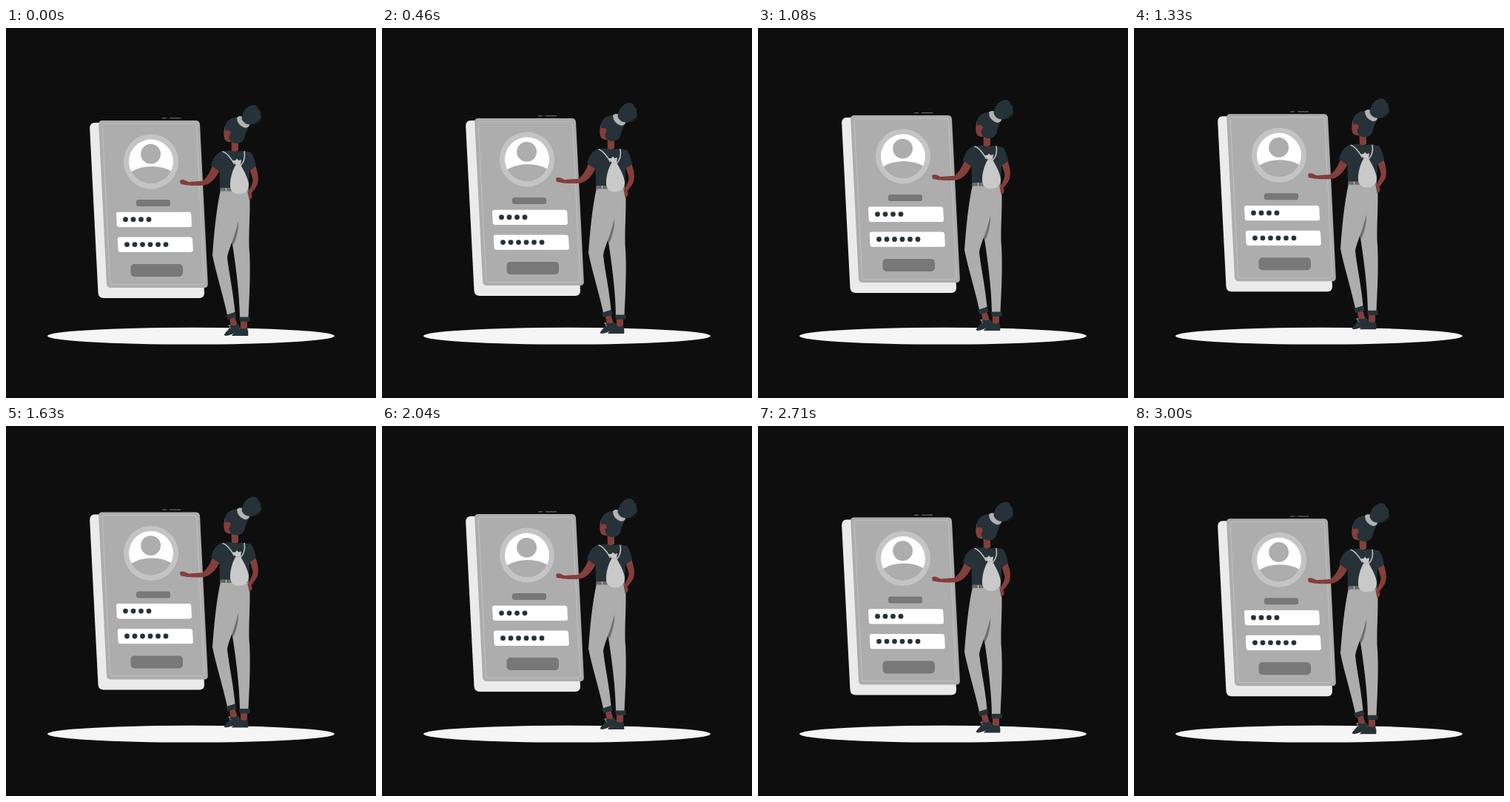
An HTML page for the animation above (3.04 s loop, 500 by 500 pixels).

```html
<!DOCTYPE html>
<html lang="en">
<head>
<meta charset="utf-8">
<title>Login card</title>
<style>
  html, body { margin: 0; height: 100%; overflow: hidden; background: #0e0e0e; }
  svg { display: block; width: 100vw; height: 100vh; }
  .dark { fill: #263238; }
  .skin { fill: #843e3b; }
  .grey { fill: #adadad; }
  .slate { fill: #787878; }
  .line { fill: none; stroke: #c7c7c7; }
</style>
</head>
<body>
<svg viewBox="0 0 500 500">
  <defs><clipPath id="disc"><circle cx="196" cy="180.6" r="30"/></clipPath></defs>
  <ellipse cx="250" cy="416.2" rx="194" ry="11.4" fill="#f5f5f5"/>
  <g id="float">
    <!-- card -->
    <path fill="#ebebeb" d="M120 128H250Q256 128 256.400 135L268 358Q268 365 261 365H132Q125 365 124.500 358L113.200 136Q113 128 120 128Z"/>
    <path class="grey" d="M130 125H256.500Q261.500 125 262 130L272.800 346Q273 351 268 351H141.500Q136.500 351 136 346L125.200 130Q125 125 130 125Z"/>
    <path class="line" stroke-width=".8" d="M133 129.300H254Q257.300 129.300 257.500 132.500L267.800 343Q268 346.500 265 346.500H144Q141 346.500 140.700 343L130.200 132.500Q130 129.300 133 129.300Z"/>
    <path class="line" style="stroke:#777" d="M211 121.800H217M221 121.800H236"/>
    <circle cx="196" cy="180.500" r="37" fill="#c4c4c4"/>
    <circle cx="196" cy="180.600" r="30" fill="#fff"/>
    <g class="grey" clip-path="url(#disc)">
      <circle cx="195.600" cy="170.200" r="13.400"/>
      <ellipse cx="197" cy="210" rx="38" ry="23"/>
    </g>
    <rect class="slate" x="176" y="232" width="46" height="9" rx="3"/>
    <path id="field" fill="#fff" d="M152 248.700H247Q250 248.700 250.200 251.700L251 266Q251.200 269 248 269H153Q150 269 149.800 266L149 251.700Q149 248.700 152 248.700Z"/>
    <use href="#field" x="1.800" y="33.800"/>
    <g id="dots" class="dark"></g>
    <rect class="slate" x="168.500" y="319" width="70.500" height="17" rx="5"/>

    <!-- legs -->
    <path class="skin" d="M302 393L309 390L313 402L304 404ZM317 396H326V408H317Z"/>
    <path class="dark" d="M294.500 415C297 410 302 407 305 401Q309 404 313 400L317 404C315 410 306 415 297 416Z"/>
    <path class="dark" d="M305 416C308 411 314 409 317 405Q322 408 326 405Q328 410 327.300 416Z"/>
    <path class="line" stroke-width=".8" d="M300 402L303 401.500L302 404L304 406"/>
    <path class="grey" d="M304 220H328.500C331 240 328 268 328.500 295C331 325 329 360 327.500 391H316C315.500 360 311 325 306 292L309 240Z"/>
    <path fill="#707070" d="M314 258C315 272 311 285 307.500 293L305 291L309 262Z"/>
    <path class="grey" d="M290 219H320C321 238 315 258 311 272C307 287 300 301 299 310C301 330 307 356 309.500 384L299 387.500C293 360 283 328 279 307C281 280 284 245 290 219Z"/>
    <path class="dark" d="M297 388L310 384L311.500 390.500L299.500 394ZM315 390.500H329.500V396.500L316 397Z"/>

    <!-- body -->
    <path class="skin" d="M329 190L337 186C341 196 342 205 339.500 212C337 217 334 220 331.500 223.500C334 227 332 231 328.500 232L326.500 222C330 216 335 209 333 203Z"/>
    <path class="skin" d="M279 186L288.500 193C284 202 277 211 268 212.500C258 213.500 246 213 240 211.500L236 211L235 206.500C238 203.500 243 206 246 208L265 206.800C271 203 276 195 279 186Z"/>
    <path fill="#6b6b6b" d="M289.500 215.500H328V220.500H289Z"/>
    <path class="line" d="M297.500 216V220.500"/>
    <path class="dark" d="M292 166.500L304 165.500Q311 168.500 319 166L331 168C335 173 337 181 338 187L329 193L328 216H289L288.500 194L277 186C279 178 283 169 292 166.500Z"/>
    <path class="skin" d="M304.500 150H314V165.500Q309.500 168.500 304.800 165.500Z"/>
    <path class="line" stroke-width="1.500" d="M292.500 167C298 168 305 177 308.500 184M322 166.500C323.500 175 321 182 317 186"/>
    <path fill="#c9c9c9" d="M310.500 185L306 179L310 179L312 176.500L314.500 179L318 178L317 185C321 192 327 202 328 211C328.500 219 324 223.500 317 224.200C310 225 303.500 222 303 214C302.500 204 306 192 310.500 185Z"/>
    <path fill="none" stroke="#a5a5a5" stroke-width=".7" d="M310 185H317"/>

    <!-- head -->
    <path class="skin" d="M296 132C294 138 293.500 147 296 151C298 154 303 155 307 153L312 136Z"/>
    <path class="dark" d="M296 134C297 125 306 120 314 121L328 132C327 137 324 141 323 146C322 153 317 156.500 310 156C304 155 301 151 301.500 146L303.500 141Q302 137 296 139Z"/>
    <ellipse class="skin" cx="301" cy="142" rx="2.400" ry="3.400"/>
    <path fill="#b2b2b2" d="M312 121Q315 118 319 119.500Q320 128 329.500 130.500Q328 134.500 323 135Q312 131 312 121Z"/>
    <path class="dark" d="M318.500 123C319 113 326 104 335 104Q341 105 340.500 109.500Q345 111 344 117Q346.500 122 342 125Q338 129 331 130.500Q322 131 318.500 123Z"/>
    <path fill="none" stroke="#263238" stroke-width=".7" d="M331 130Q342 130 345 124"/>
  </g>
</svg>
<script>
const LOOP = 3040, RISE = 10, LEAD = 50;
const group = document.getElementById('float');

const dotRow = (count, x, y) => Array.from({ length: count }, (_, i) =>
  `<circle cx="${x + i * 10.5}" cy="${y}" r="3.4"/>`).join('');
document.getElementById('dots').innerHTML = dotRow(4, 161.5, 258.7) + dotRow(6, 163.5, 292.6);

// steady rise and fall
function draw(now) {
  const phase = ((now + LEAD) % LOOP) / LOOP;
  const lift = RISE * (1 - Math.abs(1 - 2 * phase));
  group.setAttribute('transform', `translate(0 ${0.33 - lift})`);
}

const start = performance.now();
function tick() {
  draw(performance.now() - start);
  requestAnimationFrame(tick);
}
tick();
</script>
</body>
</html>
```
